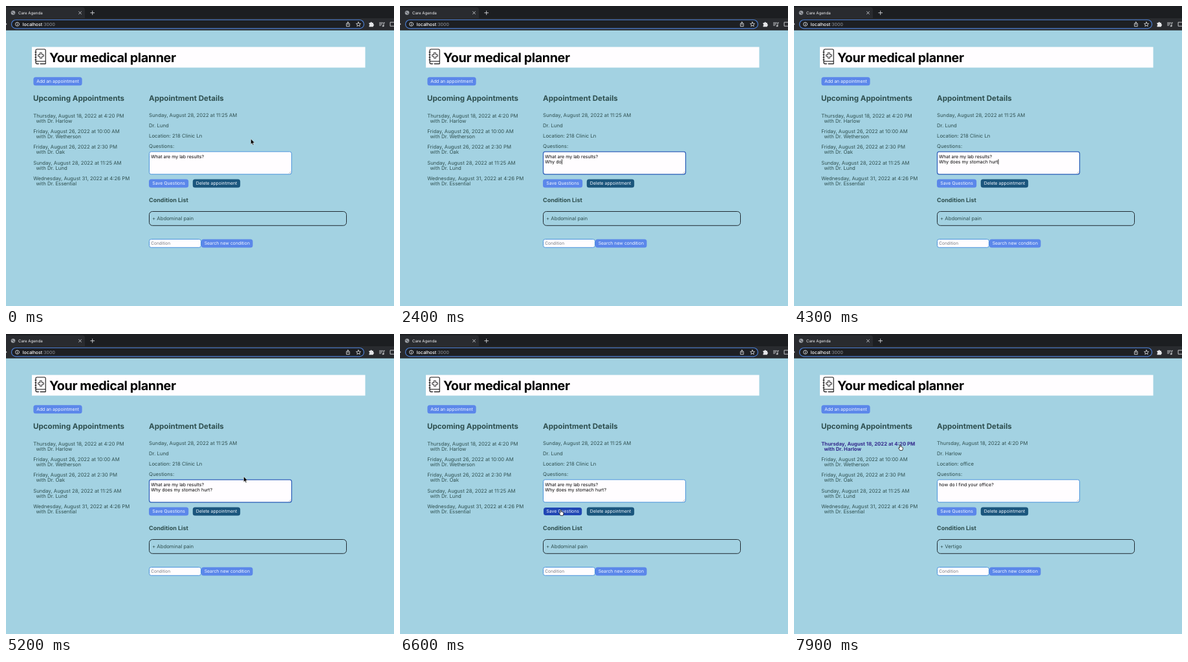
Recreate the animation shown at these times as an HTML page. Size 600 by 465 pixels, loop 8 s.

```html
<!DOCTYPE html>
<html lang="en">
<head>
<meta charset="utf-8">
<title>Appointment planner</title>
<style>
  html, body { margin: 0; width: 100%; height: 100%; overflow: hidden; background: #a3d2e2; }
  svg { display: block; width: 100vw; height: 100vh; }
  text {
    font: 7.78px Inter, "Open Sans", sans-serif;
    fill: #2f4f4f;
    white-space: pre;
    text-rendering: geometricPrecision;
  }
  .title { font-size: 19.8px; font-weight: 700; letter-spacing: -.44px; fill: #000; }
  .head { font-size: 11.6px; font-weight: 700; }
  .sub { font-size: 9px; font-weight: 700; }
  .tab { font-size: 6.1px; fill: #f1f1f3; }
  .url { font-size: 7px; font-weight: 500; fill: #fff; }
  .url tspan { font-weight: 400; fill: #92969c; }
  .btn rect { fill: #5b87ea; }
  .btn text { font-size: 6.88px; fill: #f4f8ff; text-anchor: middle; }
  .btn.alt rect { fill: #1b567d; }
  .btn.hover rect { fill: #2147b4; }
  .field { fill: #fffdff; stroke: #4a93dc; stroke-width: 1; }
  .field.focus { stroke: #2b5cb8; stroke-width: 1.2; }
  .note { font-size: 7.06px; fill: #000; }
  .hint { font-size: 6.6px; fill: #777b80; }
  .row.hover text { font-weight: 700; fill: #33298c; }
  .line { fill: none; stroke: #d4d6da; stroke-width: .9; stroke-linecap: round; stroke-linejoin: round; }
  .ink { fill: none; stroke: #111; stroke-width: 1.1; stroke-linecap: round; stroke-linejoin: round; }
</style>
</head>
<body>
<svg viewBox="0 0 600 465">
  <rect width="600" height="465" fill="#a3d2e2"/>

  <!-- browser bar -->
  <rect width="600" height="37.5" fill="#1c1e21"/>
  <path d="M0 19V2H118Q122 2 122 6V19H600V37.5H0Z" fill="#292b2f"/>
  <circle cx="11" cy="10.5" r="3.3" fill="#9ca0a6"/>
  <path d="M8.6 9.2q2 .2 2.4 1.6t2.4 1.2" fill="none" stroke="#3a3c40" stroke-width=".9"/>
  <text class="tab" x="19" y="12.7">Care Agenda</text>
  <path class="line" d="M112.6 8.7l3.8 3.8m0-3.8l-3.8 3.8M130.8 10.6h5.8m-2.9-2.9v5.8"/>
  <path d="M0 26.5L1.6 28 0 29.5Z" fill="#d4d6da"/>
  <rect x="8.5" y="21.5" width="545" height="13.4" rx="6.7" fill="#1d1f23" stroke="#4c7fd3" stroke-width="1.2"/>
  <g class="line">
    <circle cx="17.5" cy="28.2" r="3"/>
    <path d="M17.5 28v1.8m0-3.2v.1"/>
    <path d="M527.8 27h-1.4v4.6h4.8V27h-1.4m-1 2.4v-4.6m-1.2 1.2l1.2-1.2 1.2 1.2"/>
    <path d="M545 24.9l1 2.3 2.5.2-1.9 1.6.6 2.5-2.2-1.3-2.2 1.3.6-2.5-1.9-1.6 2.5-.2z"/>
    <path d="M577.5 26h5.4m-5.4 2h4m-4 2h2.4m4.1 1v-5h1.6"/>
    <circle cx="583" cy="31" r=".9"/>
    <rect x="594.5" y="25.2" width="7" height="6"/>
  </g>
  <path d="M561.5 26h2a1.2 1.2 0 0 1 2.4 0h2v2.2a1.2 1.2 0 0 1 0 2.4v1.7h-6.4v-2a1.2 1.2 0 0 0 0-2.3z" fill="#e4e5e8"/>
  <text class="url" x="25.8" y="30.5">localhost<tspan>:3000</tspan></text>

  <!-- page header -->
  <rect x="40" y="63.5" width="515.5" height="32" fill="#fffdff"/>
  <g class="ink">
    <path d="M46 87V69q0-2 2-2H59.5q1.7 0 1.7 1.7V85.8H48q-2 0-2 1.9t2 1.9h2.5M53 89.6h8.2V86"/>
    <path d="M45 71.5h1.8m-1.8 4h1.8m-1.8 4h1.8m-1.8 4h1.8"/>
    <path d="M52.6 72.6h2.8v2.8h2.8v2.8h-2.8V81h-2.8v-2.8h-2.8v-2.8h2.8z" stroke-width=".9"/>
  </g>
  <text class="title" x="67" y="86.6">Your medical planner</text>

  <text class="head" x="42" y="146.8">Upcoming Appointments</text>
  <g id="list"></g>

  <text class="head" x="221" y="146.8">Appointment Details</text>
  <text id="date" x="221" y="171.5"></text>
  <text id="doctor" x="221" y="187.6"></text>
  <text id="place" x="221" y="203.8"></text>
  <text x="221" y="219.9">Questions:</text>
  <rect id="area" class="field" x="221.5" y="225.8" width="220.2" height="35" rx="3"/>
  <path d="M437.3 259.6l3.2-3.2m-1.3 3.2l1.3-1.3" stroke="#888" stroke-width=".5"/>
  <text id="note1" class="note" x="224.2" y="235.6"></text>
  <text id="note2" class="note" x="224.2" y="244.2"></text>
  <rect id="caret" width=".8" height="8" fill="#000"/>

  <text class="sub" x="221" y="303.9">Condition List</text>
  <rect x="221.5" y="318.5" width="305" height="21.8" rx="5" fill="none" stroke="#1f2a30"/>
  <text id="condition" x="226" y="332.2"></text>
  <rect class="field" x="221.5" y="361.5" width="80" height="12.8" rx="3"/>
  <text class="hint" x="224.2" y="370.4">Condition</text>
  <g id="buttons"></g>

  <g id="arrow">
    <path d="M-.4 0V8.4L1.5 6.6 2.7 9.5 4.1 8.9 2.9 6.1H5.5Z" fill="#000" stroke="#fff" stroke-width=".5"/>
  </g>
  <g id="beam">
    <path d="M-1.5-4Q0-4 0-3V3Q0 4-1.5 4M1.5-4Q0-4 0-3M0 3Q0 4 1.5 4" fill="none" stroke="#111" stroke-width=".8"/>
  </g>
  <g id="hand">
    <path d="M-1.7.6V-3.5a.8.8 0 0 1 1.6 0V-1.3Q.9-1.8 1.2-1 2.1-1.3 2.4-.5 3.4-.6 3.4.5V1.8Q3.2 3.1 2.6 4.4H-1.3Q-2 2.8-3.4 1.2-3.6-.3-1.7.6Z" fill="#fff" stroke="#111" stroke-width=".8"/>
  </g>
</svg>
<script>
const LOOP = 8000, STEP = 100;
const $ = id => document.getElementById(id);

function add(parent, tag, attrs, text = "") {
  const el = document.createElementNS("http://www.w3.org/2000/svg", tag);
  for (const key in attrs) el.setAttribute(key, attrs[key]);
  el.textContent = text;
  return parent.appendChild(el);
}

const visits = [
  ["Thursday, August 18, 2022 at 4:20 PM", "Dr. Harlow"],
  ["Friday, August 26, 2022 at 10:00 AM", "Dr. Wetherson"],
  ["Friday, August 26, 2022 at 2:30 PM", "Dr. Oak"],
  ["Sunday, August 28, 2022 at 11:25 AM", "Dr. Lund"],
  ["Wednesday, August 31, 2022 at 4:26 PM", "Dr. Essential"]
];
const rows = visits.map(([date, doctor], i) => {
  const row = add($("list"), "g", { class: "row" });
  const y = 172.7 + i * 24.3;
  add(row, "text", { x: 42.2, y }, date);
  add(row, "text", { x: 46.4, y: y + 8 }, "with " + doctor);
  return row;
});

function button(label, x, y, w, cls = "") {
  const g = add($("buttons"), "g", { class: "btn " + cls });
  const box = add(g, "rect", { x, y, width: w, height: 13, rx: 3.5 });
  add(g, "text", { x: x + w / 2, y: y + 9 }, label);
  return { g, box, x, y, w };
}
button("Add an appointment", 42.4, 110.2, 75.2);
const save = button("Save Questions", 221, 268.4, 61.2);
button("Delete appointment", 288.8, 268.4, 73.4, "alt");
button("Search new condition", 302, 361.4, 79.6);

const typed = "Why does my stomach hurt?";
// moment of each key stroke, in tenths of a second
const strokes = [18, 19, 21, 22, 23, 24, 25, 26, 27, 28, 29, 29, 30,
                 31, 32, 33, 33, 34, 36, 37, 39, 40, 41, 42, 44];

// pointer route: time, x, y
const route = [
  [0, 379, 206], [700, 350, 238], [900, 350, 238], [1200, 371, 216],
  [4600, 371, 216], [5200, 368, 221], [5500, 366, 223], [6200, 251, 274],
  [6600, 249.5, 277], [6800, 249, 276], [7300, 183, 183], [7400, 178, 181],
  [7900, 165, 176], [LOOP, 165, 176]
];
function pointer(t) {
  const i = route.findIndex(p => p[0] > t);
  const [t0, x0, y0] = route[i - 1], [t1, x1, y1] = route[i];
  const k = (t - t0) / (t1 - t0);
  return [x0 + (x1 - x0) * k, y0 + (y1 - y0) * k];
}
const inside = ([x, y], l, t, r, b) => x >= l && x <= r && y >= t && y <= b;
const show = (el, on) => el.setAttribute("visibility", on ? "visible" : "hidden");

function drawPointer(t) {
  const at = pointer(t);
  const visible = t < 1500 || t >= 4600;
  const onSave = inside(at, 221, 268, 282, 282);
  const onRow = inside(at, 42, 164, 195, 184);
  const kind = onSave || onRow ? "hand" : inside(at, 221, 226, 442, 261) ? "beam" : "arrow";
  for (const id of ["arrow", "beam", "hand"]) {
    $(id).setAttribute("transform", `translate(${at})`);
    show($(id), visible && id === kind);
  }
  rows[0].classList.toggle("hover", onRow);
  save.g.classList.toggle("hover", onSave);
  const inset = onSave ? 1 : 0;
  save.box.setAttribute("x", save.x + inset);
  save.box.setAttribute("y", save.y + inset * .5);
  save.box.setAttribute("width", save.w - 2 * inset);
  save.box.setAttribute("height", 13 - inset);
}

function drawDetails(t) {
  const first = t >= 7800;
  const [date, doctor] = visits[first ? 0 : 3];
  $("date").textContent = date;
  $("doctor").textContent = doctor;
  $("place").textContent = "Location: " + (first ? "office" : "218 Clinic Ln");
  $("condition").textContent = first ? "+ Vertigo" : "+ Abdominal pain";
  $("note1").textContent = first ? "how do I find your office?" : "What are my lab results?";
  const count = strokes.filter(s => s * 100 <= t).length;
  $("note2").textContent = first ? "" : typed.slice(0, count);
}

function drawCaret(t) {
  const focus = t >= 700 && t < 6500;
  $("area").classList.toggle("focus", focus);
  const keys = [700, 1500, ...strokes.map(s => s * 100)];
  const last = Math.max(...keys.filter(k => k <= t), 0);
  show($("caret"), focus && (t - last) % 1000 < 500);
  const line = t < 1500 ? $("note1") : $("note2");
  $("caret").setAttribute("x", 224.4 + line.getComputedTextLength());
  $("caret").setAttribute("y", t < 1500 ? 228.9 : 237.5);
}

const start = performance.now();
function frame() {
  const t = Math.floor((performance.now() - start) % LOOP / STEP) * STEP;
  drawDetails(t);
  drawCaret(t);
  drawPointer(t);
  requestAnimationFrame(frame);
}
frame();
</script>
</body>
</html>
```
